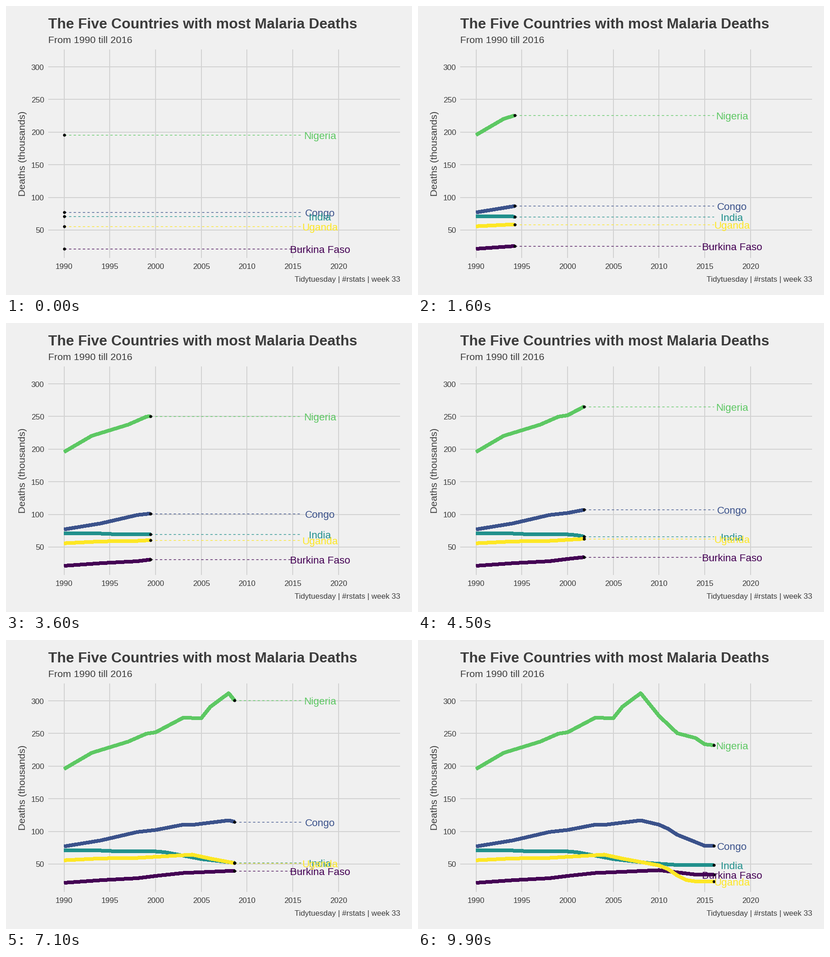
Animation of 885x632 px, one loop 10000 ms. Source, as a matplotlib script:

```python
import numpy as np
import matplotlib.pyplot as plt
from matplotlib.animation import FuncAnimation

W, H, DPI = 885, 632, 64
PX = 72 / DPI                              # points per pixel
FRAMES, INTERVAL = 100, 100
LEFT, RIGHT, TOP, BOTTOM = 92, 859, 95, 551
X0, X1 = 1988.25, 2026.75
Y0, Y1 = 7.27, 326.65
FIRST, LAST = 1990, 2016
BG, GRID, INK = "#F0F0F0", "#D2D2D2", "#3C3C3C"

# turning points of each curve: years since 1990 and thousands of deaths
CURVES = [
    ("Burkina Faso", "#440154", [(0, 21.3), (4, 25.3), (8, 28.3), (10, 31.8), (13, 36.3),
                                 (20, 40.6), (24, 33.9), (26, 33.6)]),
    ("Congo", "#3B528B", [(0, 77.1), (4, 86.2), (8, 99.1), (10, 102.2), (13, 110.3), (14, 110),
                          (18, 116.9), (20, 110.3), (21, 104), (22, 94.9), (25, 78), (26, 78)]),
    ("India", "#21908C", [(0, 70.8), (4, 70.7), (6, 69.4), (10, 69.3), (11, 68.2), (15, 57.7),
                          (19, 51.4), (22, 48.6), (26, 48.7)]),
    ("Nigeria", "#5DC863", [(0, 195.8), (3, 220.3), (7, 237.5), (9, 249.7), (10, 251.8),
                            (13, 274), (15, 273.5), (16, 291), (18, 311.7), (20, 277),
                            (22, 250.4), (24, 243), (25, 233.5), (26, 232)]),
    ("Uganda", "#FDE725", [(0, 55.8), (4, 58.6), (8, 59.4), (14, 64.4), (16, 58.4), (20, 47.9),
                           (21, 42.3), (22, 32.5), (23, 25.5), (24, 23.5), (26, 23.7)]),
]

plt.rcParams["font.family"] = "Liberation Sans"
fig = plt.figure(figsize=(W / DPI, H / DPI), dpi=DPI, facecolor=BG)
ax = fig.add_axes([LEFT / W, 1 - BOTTOM / H, (RIGHT - LEFT) / W, (BOTTOM - TOP) / H])
ax.set(xlim=(X0, X1), ylim=(Y0, Y1))
ax.axis("off")


def note(x, y, text, size, ha="left", **kw):
    """Place text by its baseline, in pixels from the top left."""
    fig.text(x / W, 1 - y / H, text, fontsize=size * PX, color=INK,
             ha=ha, va="baseline", **kw)


def px_x(year):
    return LEFT + (year - X0) / (X1 - X0) * (RIGHT - LEFT)


def px_y(value):
    return BOTTOM - (value - Y0) / (Y1 - Y0) * (BOTTOM - TOP)


for year in range(1990, 2021, 5):
    ax.axvline(year, color=GRID, lw=2 * PX, zorder=1)
    note(px_x(year), 575, str(year), 17, "center")
for value in range(50, 301, 50):
    ax.axhline(value, color=GRID, lw=2 * PX, zorder=1)
    note(83, px_y(value) + 6.5, str(value), 17, "right")

note(92, 49, "The Five Countries with most Malaria Deaths", 31.65, weight="bold")
note(92, 81, "From 1990 till 2016", 21.4)
note(42, 322.5, "Deaths (thousands)", 21.4, "center", rotation=90, rotation_mode="anchor")
note(859, 603, "Tidytuesday | #rstats | week 33", 16.8, "right")

LABEL_DROP = 9 * (Y1 - Y0) / (BOTTOM - TOP)
DASH = 5 / 1.33


class Track:
    """One country's curve, with its leading dot, dashed guide and label."""

    def __init__(self, name, color, points):
        self.years, self.values = np.array(points).T
        self.years += FIRST
        self.line, = ax.plot([], [], color=color, lw=7 * PX, zorder=2, antialiased=False,
                             solid_capstyle="butt", solid_joinstyle="round")
        self.guide, = ax.plot([], [], color=color, lw=1.33 * PX, zorder=3,
                              ls=(0, (DASH, DASH)), dash_capstyle="butt")
        self.dot, = ax.plot([], [], "o", color="black", ms=6.5 * PX, mew=0,
                            snap=False, zorder=4)
        self.label = ax.text(2018, 0, name, color=color, fontsize=22.2 * PX,
                             ha="center", va="baseline", zorder=5)

    def show(self, now):
        value = np.interp(now, self.years, self.values)
        past = self.years < now
        self.line.set_data([*self.years[past], now], [*self.values[past], value])
        self.guide.set_data([now, LAST], [value, value])
        self.dot.set_data([now], [value])
        self.label.set_y(value - LABEL_DROP)
        return self.line, self.guide, self.dot, self.label


tracks = [Track(*curve) for curve in CURVES]


def update(frame):
    now = FIRST + (LAST - FIRST) * frame / (FRAMES - 1)
    return [artist for track in tracks for artist in track.show(now)]


anim = FuncAnimation(fig, update, frames=FRAMES, interval=INTERVAL,
                     init_func=lambda: update(0), repeat=True, repeat_delay=0, blit=False)
plt.show()
```
